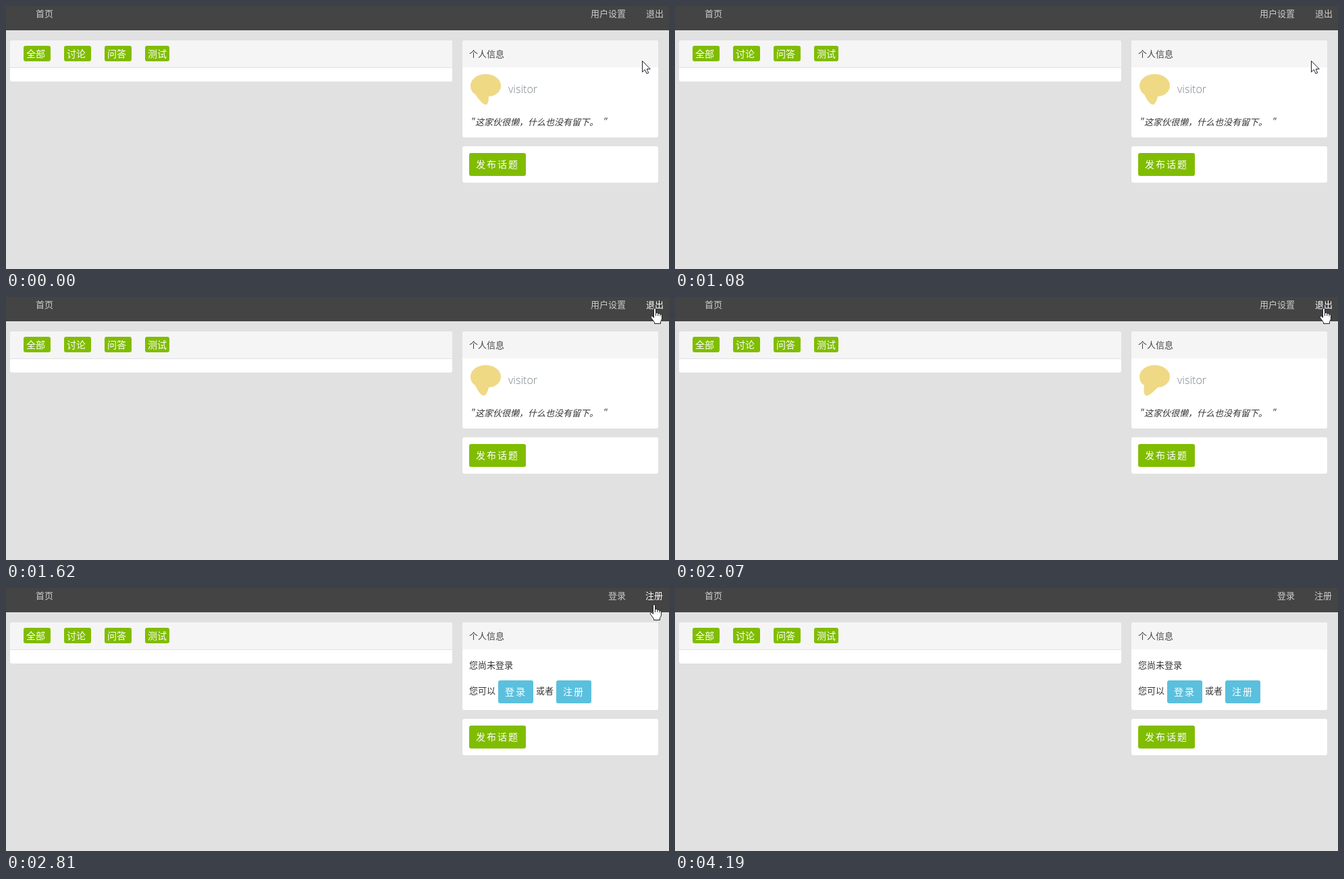
An HTML page for the animation above (4560 ms loop, 982x390 px).

```html
<!DOCTYPE html>
<html lang="zh-CN">
<head>
<meta charset="utf-8">
<title>个人信息</title>
<style>
html, body { margin: 0; width: 100%; height: 100%; overflow: hidden; background: #e1e1e1; }
svg { display: block; font: 13px "Noto Sans CJK SC", "Noto Sans CJK", sans-serif; }
text { fill: #333; white-space: pre; }
.nav text { fill: #ccc; }
.nav text.on { fill: #fff; }
.head { fill: #444; }
.tag { font-size: 14px; fill: #fff; }
.btn { font-size: 14px; letter-spacing: 2px; fill: #fff; }
.user { font: 300 16px "Open Sans", "Noto Sans", sans-serif; fill: #778087; }
.note { font-style: italic; }
.cursor path { fill: #fff; stroke: #1c1f2b; stroke-linejoin: round; }
</style>
</head>
<body>
<svg id="stage" width="982" height="390" viewBox="0 0 982 390"></svg>
<script>
const LOOP = 4560, STEP = 90, LOGOUT = 2160, HOVER = 2810, LEAVE = 3650, GONE = 4190;
const GREEN = '#80bd01', BLUE = '#5bc0de';

const text = (x, y, s, cls = '') => `<text x="${x}" y="${y}" class="${cls}">${s}</text>`;
const box = (x, y, w, h, fill, r = 3) =>
  `<rect x="${x}" y="${y}" width="${w}" height="${h}" rx="${r}" fill="${fill}"/>`;
const button = (x, y, s, fill) =>
  box(x, y, 20 + 16 * s.length, 34, fill) + text(x + 10, y + 22, s, 'btn');
const panel = (x, y, w, h) => box(x, y, w, h, '#fff') +
  `<path d="M${x} ${y + 40}V${y + 3}q0-3 3-3H${x + w - 3}q3 0 3 3V${y + 40}z" fill="#f5f5f5"/>`;
const publish = y => box(676, y, 290, 54, '#fff') + button(686, y + 10, '发布话题', GREEN);

const tags = ['全部', '讨论', '问答', '测试'].map((s, i) => {
  const x = 26 + 60 * i;
  return box(x, 59, i < 3 ? 40 : 36, 23, GREEN) + text(x + 4, 76, s, 'tag');
}).join('');

const member = panel(676, 51, 290, 144) + text(686, 76, '个人信息', 'head') +
  '<path id="avatar" fill="#efd985"/>' + text(744, 129, 'visitor', 'user') +
  text(687, 177, '"', 'note') + text(695, 177, '这家伙很懒，什么也没有留下。', 'note') +
  text(883, 177, '"', 'note') + publish(208);

const guest = panel(676, 51, 290, 130) + text(686, 76, '个人信息', 'head') +
  text(686, 119, '您尚未登录') + text(686, 157, '您可以') + button(729, 137, '登录', BLUE) +
  text(785, 157, '或者') + button(815, 137, '注册', BLUE) + publish(194);

document.getElementById('stage').innerHTML =
  box(0, 0, 982, 390, '#e1e1e1', 0) + box(0, 0, 982, 36, '#444', 0) +
  `<g class="nav">${text(44, 16, '首页')}
    <g id="memberNav">${text(866, 16, '用户设置')}<text id="exit" x="948" y="16">退出</text></g>
    <g id="guestNav">${text(892, 16, '登录')}<text id="join" x="947" y="16">注册</text></g></g>` +
  panel(6, 51, 655, 61) + box(6, 91, 655, 1, '#e2e2e2', 0) + tags +
  `<g id="member">${member}</g><g id="guest">${guest}</g>
  <g id="cursor" class="cursor">
    <path id="arrow" d="M.5 .5V17l3.9-3.6 2.6 5.9 2.7-1.2-2.5-5.7h5z"/>
    <path id="hand" d="M-1.5 2Q-1.5.5 0 .5T1.500 2V7.500Q4.500 6.500 4.800 8.500Q7.500 7.500 8 9.700Q10.500 9 10.500 11.500V16Q10.500 18 8.500 20.500V23.500H-.5V21.500L-5 15.500Q-6.500 13 -4.800 12.200Q-3.500 11.800 -1.500 14.500Z
      M1.500 7.500V12M4.800 8.500V12M8 9.700V12.500"/>
  </g>`;

const el = {};
document.querySelectorAll('[id]').forEach(n => el[n.id] = n);
const show = (n, on) => n.setAttribute('display', on ? 'inline' : 'none');
const mix = (a, b, u) => a.map((v, i) => v + (b[i] - v) * u);
const clamp = u => Math.max(0, Math.min(1, u));

function pointer(t) {
  if (t < LOGOUT) {
    const u = clamp((t - 1080) / 540);
    return mix([942, 81], [961, 16], u * u * (3 - 2 * u));
  }
  if (t < HOVER) return [960, 16];
  if (t < LEAVE) return [960, 24];
  return mix([959, 29], [942, 389], clamp((t - LEAVE) / 450) ** 1.4);
}

function avatarPath(k) {
  const n = k - (k >= 6) - (k >= 21); // two beats hold still
  const x = 703 + 12 * Math.cos(n * Math.PI / 3);
  return `M688 118A22.500 17 0 0 1 733 118C733 128 724 134 715 134Q${x} 160 695 131C690 128 688 123 688 118Z`;
}

function draw(ms) {
  const now = ms % LOOP, k = Math.floor(now / STEP);
  const t = now < LOGOUT ? k * STEP
    : now < LEAVE ? now
    : LEAVE + Math.floor((now - LEAVE) / STEP) * STEP;
  const out = t >= LOGOUT;
  const [x, y] = pointer(t).map(Math.round);
  const over = y < 36 && !(out && t < HOVER);

  show(el.member, !out);
  show(el.memberNav, !out);
  show(el.guest, out);
  show(el.guestNav, out);
  el.exit.setAttribute('class', over ? 'on' : '');
  el.join.setAttribute('class', over ? 'on' : '');
  if (!out) el.avatar.setAttribute('d', avatarPath(k));

  show(el.cursor, t < GONE);
  show(el.arrow, !over);
  show(el.hand, over);
  el.cursor.setAttribute('transform', `translate(${x} ${y})`);
}

const start = performance.now();
function tick() {
  draw(performance.now() - start);
  requestAnimationFrame(tick);
}
tick();
</script>
</body>
</html>
```
